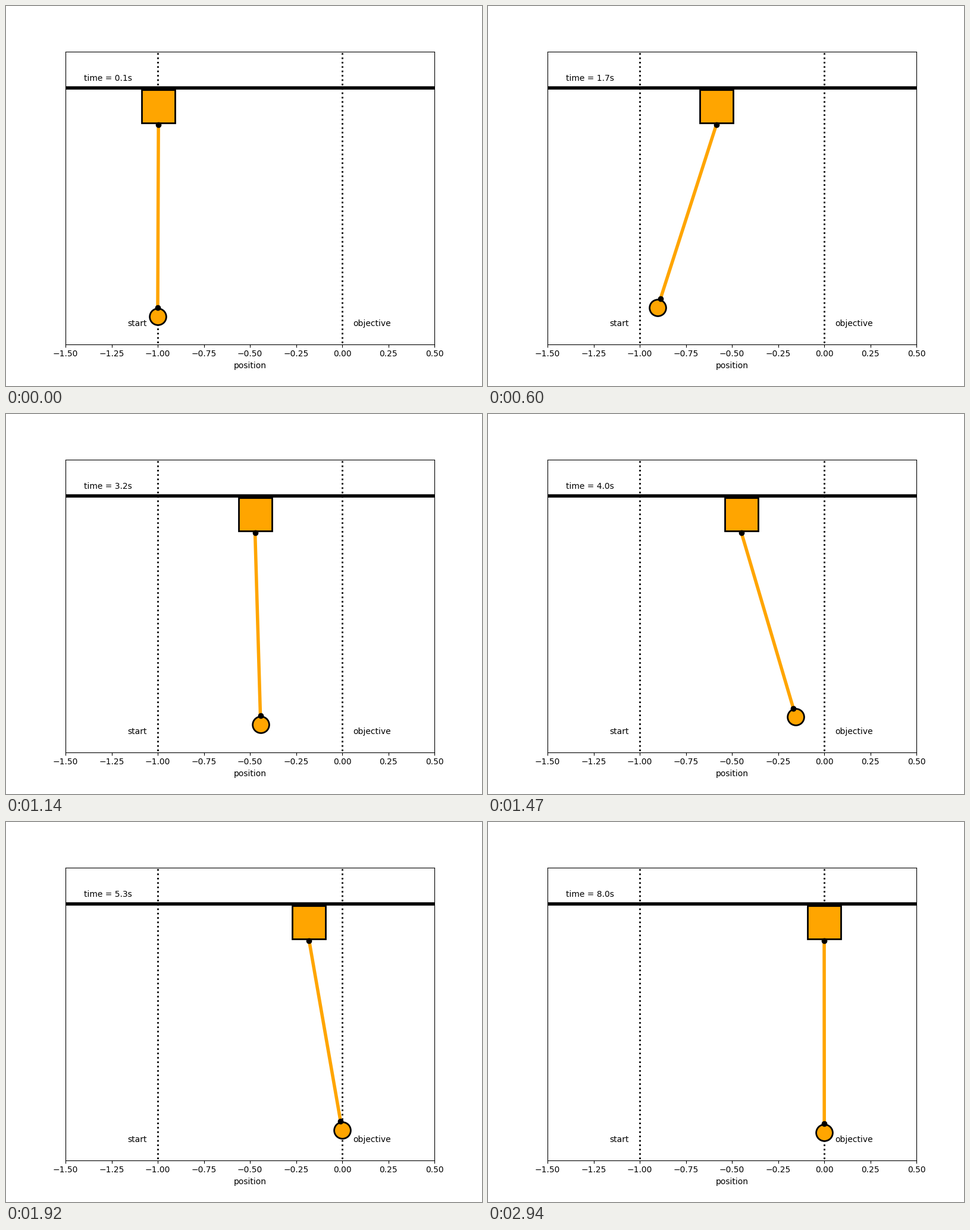
Recreate the animation shown at these times as a matplotlib script. Size 800 px wide and 640 px high, loop 2.97 s.

```python
import numpy as np
import matplotlib.pyplot as plt
from matplotlib.animation import FuncAnimation

STEPS = 99          # time steps after t = 0
T_END = 8.0
T_GOAL = 6.2        # the load must be at rest from here on
CART, LOAD = 10.0, 5.0
EFFORT = 0.001      # penalty on the control input


def solve_crane():
    """Least-effort control of the cart; returns time, position and angle."""
    t = np.linspace(0, T_END, STEPS + 1)
    dt = t[1]
    eps = LOAD / (CART + LOAD)
    # state: cart position, cart speed, angle, angular speed
    a = np.array([[0, 1, 0, 0],
                  [0, 0, eps, 0],
                  [0, 0, 0, 1],
                  [0, 0, -1, 0]], float)
    b = np.array([0, 1, 0, -1], float)
    x0 = np.array([-1, 0, 0, 0], float)

    # implicit Euler, kept as the response of each state to every input
    step = np.linalg.inv(np.eye(4) - dt * a)
    resp = np.zeros((STEPS + 1, 4, STEPS))
    for k in range(1, STEPS + 1):
        s = resp[k - 1].copy()
        s[:, k - 1] += dt * b
        resp[k] = step @ s

    goal = resp[t >= T_GOAL]
    lhs = np.vstack([goal.reshape(-1, STEPS), np.sqrt(EFFORT) * np.eye(STEPS)])
    rhs = np.concatenate([np.tile(-x0, len(goal)), np.zeros(STEPS)])
    u = np.linalg.lstsq(lhs, rhs, rcond=None)[0]
    x = x0 + resp @ u
    return t, x[:, 0], x[:, 2]


time, pos, angle = solve_crane()

plt.rcParams["font.family"] = "DejaVu Sans"
fig = plt.figure(figsize=(8, 6.4), dpi=100)
ax = fig.add_subplot(111, autoscale_on=False, xlim=(-1.5, 0.5), ylim=(-1.2, 0.4))
ax.set_xlabel("position")
ax.get_yaxis().set_visible(False)

ax.plot([-2, 2], [0.2, 0.2], "k-", lw=4)
for x in (-1, 0):
    ax.plot([x, x], [-1.5, 1.5], "k:", lw=2)


def body(marker, size):
    return ax.plot([], [], ls="None", marker=marker, ms=size, color="orange",
                   mec="k", mew=2)[0]


cart = body("s", 40)
load = body("o", 20)
rope, = ax.plot([], [], "o-", color="orange", lw=4, ms=6, mec="k", mfc="k")
clock = ax.text(0.05, 0.9, "", transform=ax.transAxes)
ax.text(-1.06, -1.1, "start", ha="right")
ax.text(0.06, -1.1, "objective", ha="left")


def draw(frame):
    k = frame + 1
    x, sin, cos = pos[k], np.sin(angle[k]), np.cos(angle[k])
    cart.set_data([x], [0.1])
    rope.set_data([x, x + sin], [0, -cos])
    load.set_data([x + 1.05 * sin], [-1.05 * cos])
    clock.set_text(f"time = {time[k]:.1f}s")
    return cart, load, rope, clock


anim = FuncAnimation(fig, draw, frames=STEPS, interval=30, repeat=True,
                     repeat_delay=0, blit=False)
plt.show()
```
